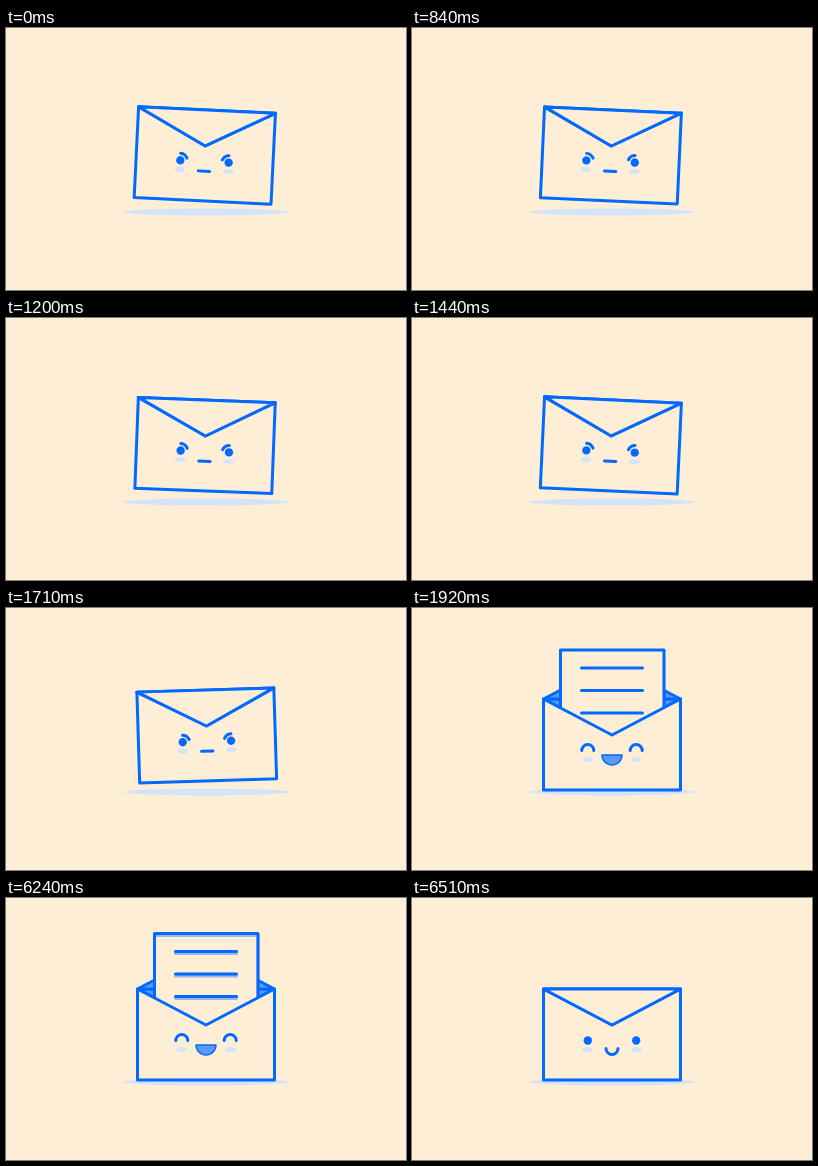
An HTML page with a canvas that plays this animation: 400x262 px, repeating every 7170 ms.

```html
<!DOCTYPE html>
<html lang="en">
<head>
<meta charset="utf-8">
<title>Envelope</title>
<style>
  html, body { margin: 0; width: 100%; height: 100%; overflow: hidden; background: #ffeed6; }
  canvas { display: block; width: 400px; height: 262px; }
</style>
</head>
<body>
<canvas id="stage"></canvas>
<script>
const LOOP = 7170, STEP = 30;
const PAPER = '#ffeed6', LINE = '#0069ff', INSIDE = '#5b98fa', PALE = '#d3e4f8';
const LEFT = 131.5, RIGHT = 268.5, TOP = 91, BOTTOM = 182, MID = 200, FLAP = 36;
const PIVOT_Y = 112, LIFT = 9, LETTER_TRAVEL = 56;

const canvas = document.getElementById('stage');
const ctx = canvas.getContext('2d');
const ratio = window.devicePixelRatio || 1;
canvas.width = 400 * ratio;
canvas.height = 262 * ratio;

const progress = (t, from, to) => Math.min(1, Math.max(0, (t - from) / (to - from)));
const smooth = p => p * p * (3 - 2 * p);
const outBack = p => 1 + 2.7 * (p - 1) ** 3 + 1.7 * (p - 1) ** 2;

function paint(fill, width = 3) {
  if (fill) { ctx.fillStyle = fill; ctx.fill(); }
  if (width) { ctx.lineWidth = width; ctx.stroke(); }
}

function poly(points, fill, closed = true) {
  ctx.beginPath();
  points.forEach(([x, y]) => ctx.lineTo(x, y));
  if (closed) ctx.closePath();
  paint(fill);
}

function ellipse(x, y, rx, ry, fill) {
  ctx.beginPath();
  ctx.ellipse(x, y, rx, ry, 0, 0, Math.PI * 2);
  paint(fill, 0);
}

function halfCircle(x, y, r, upward) {
  ctx.beginPath();
  ctx.arc(x, y, r, 0, Math.PI, upward);
}

function drawFlap(openness, fill) {
  poly([[LEFT, TOP], [RIGHT, TOP], [MID, TOP + FLAP * openness]], fill);
}

function letterLines(offset) {
  poly([[148.5, 126 + offset], [148.5, 35.5 + offset], [252, 35.5 + offset], [252, 126 + offset]], null, false);
  for (const y of [53.5, 76, 98.5]) poly([[169.5, y + offset], [230.5, y + offset]], null, false);
}

function drawLetter(offset, trailing) {
  ctx.fillStyle = PAPER;
  ctx.fillRect(148.5, 35.5 + offset, 103.5, 90.5);
  if (trailing) {
    ctx.globalAlpha = 0.4;
    letterLines(offset + 2);
    ctx.globalAlpha = 1;
  }
  letterLines(offset);
}

function drawFace(mood) {
  for (const side of [-1, 1]) {
    const x = MID + side * 24.2, y = 142.5;
    ellipse(x, 151.5, 5.5, 2.5, PALE);
    if (mood === 'happy') {
      halfCircle(x, y, 6, true);
      paint();
    } else {
      ellipse(x, y, 4.2, 4.2, LINE);
    }
    if (mood === 'angry') {
      ctx.beginPath();
      ctx.moveTo(x, y - 7);
      ctx.quadraticCurveTo(x - side * 4.5, y - 6.8, x - side * 6.5, y - 2.5);
      paint();
    }
  }
  if (mood === 'angry') {
    poly([[194.3, 152.2], [205.7, 152.2]], null, false);
  } else if (mood === 'happy') {
    halfCircle(MID, 147, 10, false);
    ctx.closePath();
    paint(INSIDE, 1.5);
  } else {
    halfCircle(MID, 150.5, 6, false);
    paint();
  }
}

function pose(t) {
  const shakeTime = Math.max(0, t - 660);
  const damping = 1 - progress(t, 1650, 1800);
  const closing = t >= 6240;
  const descent = progress(t, 6240, 6420);
  return {
    angle: 4.6 * damping * Math.sin(0.6545 + shakeTime / 181.5 * Math.PI * 2),
    lift: LIFT * (1 - smooth(progress(t, 1740, 1860))),
    flap: closing ? -1 + 2 * smooth(progress(t, 6390, 6510))
                  : 1 - 2 * smooth(progress(t, 1770, 1890)),
    letter: closing ? LETTER_TRAVEL * descent ** 2
                    : LETTER_TRAVEL * (1 - outBack(progress(t, 1860, 2070))),
    trailing: closing && descent < 1,
    mood: t < 1800 ? 'angry' : t < 6420 ? 'happy' : 'calm'
  };
}

function draw(t) {
  const p = pose(t);
  ctx.setTransform(ratio, 0, 0, ratio, 0, 0);
  ctx.fillStyle = PAPER;
  ctx.fillRect(0, 0, 400, 262);
  ctx.strokeStyle = LINE;
  ctx.lineCap = ctx.lineJoin = 'round';
  ellipse(MID, 184, 83, 3.4, PALE);

  ctx.translate(MID, PIVOT_Y - p.lift);
  ctx.rotate(p.angle * Math.PI / 180);
  ctx.translate(-MID, -PIVOT_Y);

  drawFlap(1, INSIDE);
  if (p.flap < 0) drawFlap(p.flap, INSIDE);
  if (p.letter < LETTER_TRAVEL) drawLetter(p.letter, p.trailing);
  poly([[LEFT, TOP], [MID, TOP + FLAP], [RIGHT, TOP], [RIGHT, BOTTOM], [LEFT, BOTTOM]], PAPER);
  if (p.flap >= 0) drawFlap(p.flap, PAPER);
  drawFace(p.mood);
}

const start = performance.now();
function tick() {
  const t = (performance.now() - start) % LOOP;
  draw(Math.floor(t / STEP) * STEP);
  requestAnimationFrame(tick);
}
tick();
</script>
</body>
</html>
```
